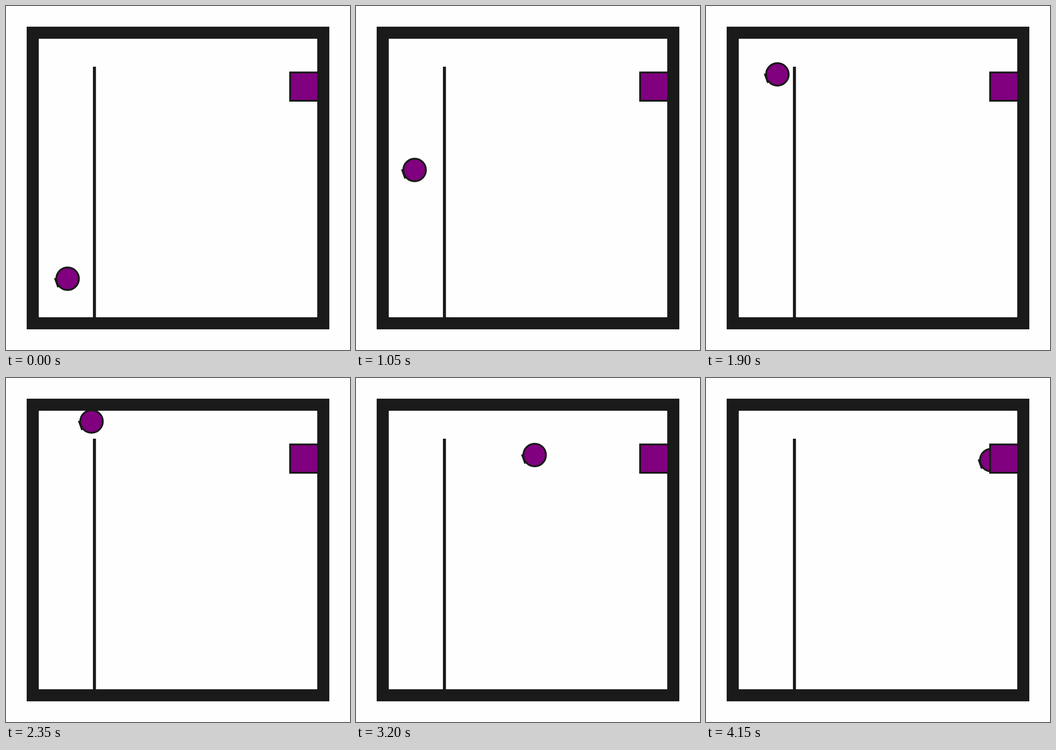
Animation, 748 px wide and 748 px high, one loop 4.2 s. Source, as an HTML page:

```html
<!DOCTYPE html>
<html>
<head>
<meta charset="utf-8">
<style>
  html, body { margin: 0; width: 100%; height: 100%; overflow: hidden; background: #fefefe; }
  svg { display: block; width: 748px; height: 748px; }
</style>
</head>
<body>
<svg viewBox="0 0 748 748" fill="#800080" stroke="#1a1a1a" stroke-width="4">
  <g id="ball">
    <path d="M-29.5-.8L-22.4 19.2L-10 14.7L-17-5.2Z" fill="#1a1a1a" stroke="none"/>
    <circle r="24.5"/>
  </g>
  <rect x="617.8" y="144.5" width="72" height="61.5"/>
  <path d="M192.3 132V690" stroke-width="6.6"/>
  <rect x="58.1" y="58.1" width="631.8" height="631.8" fill="none" stroke-width="26.3"/>
</svg>
<script>
const STEP = 50, STEPS = 84;
const ball = document.getElementById('ball');

// Key points of the smooth path: moves made, x, y.
const path = [
  [0, 134, 593], [4, 145, 559], [8, 127, 515], [15, 112.7, 429.5],
  [21, 127.5, 356.5], [31, 147, 235], [42, 163.5, 102.5], [44, 186, 94.5],
  [52, 279, 145], [61, 388.5, 167.5], [69, 486.5, 179], [80, 620.3, 178.5]
];
// Steps on which the top wall blocks the ball.
const blocked = [43, 44, 46];

// Slope through the neighbours of point i on one axis.
function slope(i, axis) {
  const a = path[Math.max(i - 1, 0)], b = path[Math.min(i + 1, path.length - 1)];
  return (b[axis] - a[axis]) / (b[0] - a[0]);
}

// Cubic Hermite curve through the key points.
function position(n) {
  const i = Math.max(1, path.findIndex(p => p[0] >= n));
  const a = path[i - 1], b = path[i], span = b[0] - a[0];
  const k = (n - a[0]) / span, j = 1 - k;
  return [1, 2].map(axis =>
    j * j * (1 + 2 * k) * a[axis] + k * k * (1 + 2 * j) * b[axis] +
    span * k * j * (j * slope(i - 1, axis) - k * slope(i, axis)));
}

const start = performance.now();
function draw(now) {
  const step = Math.floor(Math.max(0, now - start) / STEP) % STEPS;
  const moves = step - blocked.filter(b => b <= step).length;
  const [x, y] = position(moves);
  ball.setAttribute('transform', `translate(${x} ${y})`);
  requestAnimationFrame(draw);
}
draw(start);
</script>
</body>
</html>
```
